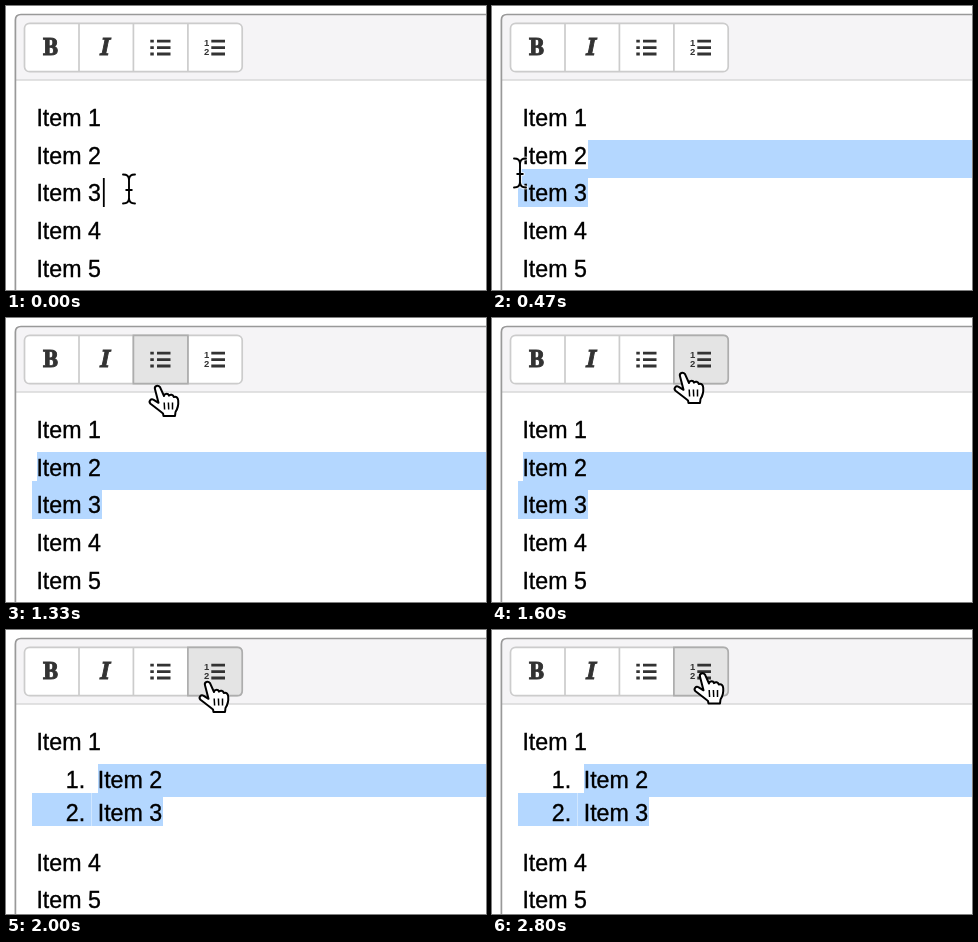
Recreate the animation shown at these times as an HTML page. Size 480 by 284 pixels, loop 2.94 s.

```html
<!DOCTYPE html>
<html lang="en">
<head>
<meta charset="utf-8">
<title>List editor</title>
<style>
  html, body { margin: 0; width: 100%; height: 100%; overflow: hidden; background: #fff; }
  svg { display: block; width: 100%; height: 100%; }
  .copy { font: 23.2px "Liberation Sans", Arial, Helvetica, sans-serif; fill: #000; stroke: #000; stroke-width: .35; }
  .serif { font: bold 23px "Noto Serif", serif; fill: #333; stroke: #333; stroke-width: .9; text-anchor: middle; }
  .slant { font-style: italic; }
  .tiny { font: bold 9.5px "Liberation Sans", Arial, sans-serif; fill: #333; }
  .sel { fill: #b4d7ff; }
</style>
</head>
<body>
<svg viewBox="0 0 480 284">
  <defs>
    <path id="beam" fill="none" stroke-linecap="round"
          d="M-6 -14.5C-2 -14.5 0 -13 0 -9V9C0 13 -2 14.5 -6 14.5M6 -14.5C2 -14.5 0 -13 0 -9M0 9C0 13 2 14.5 6 14.5M-2.8 1H2.8"/>
  </defs>

  <path d="M9.4 74V14Q9.4 8.5 15 8.5H500V74Z" fill="#f5f4f6"/>
  <path d="M10 74H480" stroke="#d9d9d9" stroke-width="1.5"/>
  <path d="M9.4 300V14Q9.4 8.5 15 8.5H500" fill="none" stroke="#999" stroke-width="1.7"/>

  <g stroke="#ccc" stroke-width="1.7">
    <rect x="18.5" y="17.3" width="217.7" height="48.4" rx="5" fill="#fff"/>
    <path d="M73 17V66M127.4 17V66M181.9 17V66"/>
    <path id="bullets" d="M127.4 17.3H181.9V65.7H127.4Z" fill="#e4e4e4" stroke="#adadad"/>
    <path id="numbers" d="M181.9 17.3H231.2Q236.2 17.3 236.2 22.3V60.7Q236.2 65.7 231.2 65.7H181.9Z" fill="#e4e4e4" stroke="#adadad"/>
  </g>

  <text class="serif" x="44.5" y="49.4">B</text>
  <text class="serif slant" x="98.8" y="49.4">I</text>
  <path id="bars" stroke="#333" stroke-width="2.8"/>
  <text class="tiny" x="198" y="40">1</text>
  <text class="tiny" x="198" y="49.3">2</text>

  <g id="selection"></g>
  <g id="plain" class="copy"></g>
  <g id="listed" class="copy"></g>
  <path id="caret" d="M97.8 172V201" stroke="#000" stroke-width="1.8"/>

  <g id="ibeam">
    <use href="#beam" stroke="#fff" stroke-opacity=".75" stroke-width="4"/>
    <use href="#beam" stroke="#000" stroke-width="1.9"/>
  </g>
  <g id="hand" stroke="#000" stroke-linejoin="round">
    <path fill="#fff" stroke-width="2"
          d="M-3 3.2C-4 0 0 -1.5 2 1.2L6 10C6 7.5 10 7 11 9.6C12.5 8 15 8.5 15.8 11C18.5 10 20 12 20.2 14.5C20.6 19 19.5 23 17.5 26L17 30H5.5L5 27.5C2.5 25.5 -2 22 -7.5 17.8C-9.8 15.4 -7.3 12.3 -4.3 13.8L.5 16.8Z"/>
    <path d="M6.2 16.5L6.6 23.5M10.4 16.5L10.7 23.5M14.5 16.5V23.5" stroke-width="1.5"/>
  </g>
</svg>
<script>
const LOOP = 2940, STEP = 200 / 3;
const LEFT = 30.4, INDENT = 91.7, NUMBER = 59.8, PITCH = 37.65;
const REACH_SECOND = 9, LIST_STEP = 30;

const easeIn = f => f * f;
const easeOut = f => 1 - (1 - f) ** 2;
const easeBoth = f => f * f * (3 - 2 * f);

// pointer legs, timed in steps
const origin = [123, 183];
const legs = [
  { from: 0, to: 7, x: 28, y: 167, ease: easeBoth },
  { from: 8, to: 11, x: 28, y: 154, ease: easeOut },
  { from: 16, to: 20, x: 152, y: 68, ease: easeIn },
  { from: 20, to: 24, x: 191, y: 55, ease: easeOut },
  { from: 24, to: 27, x: 202, y: 52, ease: easeOut },
  { from: 30, to: 37, x: 211, y: 43.5, ease: easeBoth }
];

const $ = id => document.getElementById(id);
const show = (id, on) => $(id).setAttribute("display", on ? "inline" : "none");
const text = (x, y, s) => `<text x="${x}" y="${y}">${s}</text>`;
const box = (x1, y1, x2, y2) => `<rect class="sel" x="${x1}" y="${y1}" width="${x2 - x1}" height="${y2 - y1}"/>`;

function build() {
  const rows = [35.2, 41.6, 48];
  $("bars").setAttribute("d", rows.map(y => `M144.3 ${y}h3.5M151 ${y}h13.5M205.3 ${y}h13.7`).join(""));

  const items = [1, 2, 3, 4, 5];
  const baseline = n => 82.4 + PITCH * n;
  $("plain").innerHTML = items.map(n => text(LEFT, baseline(n), "Item " + n)).join("");
  $("listed").innerHTML = items.map(n => {
    const inList = n === 2 || n === 3;
    const y = baseline(n) + (n === 3 ? -4.5 : n > 3 ? 7.6 : 0);
    return text(inList ? INDENT : LEFT, y, "Item " + n) + (inList ? text(NUMBER, y, n - 1 + ".") : "");
  }).join("");
}

function pointer(step) {
  return legs.reduce(([x, y], leg) => {
    const f = leg.ease(Math.min(1, Math.max(0, (step - leg.from) / (leg.to - leg.from))));
    return [x + (leg.x - x) * f, y + (leg.y - y) * f];
  }, origin);
}

// left edge of the letter in "Item 3" nearest to the pointer
function letterEdge(x) {
  const line = $("plain").children[2];
  const edges = [...line.textContent].map((_, i) => line.getStartPositionOfChar(i).x);
  return [...edges, 96].reduce((a, b) => Math.abs(b - x) < Math.abs(a - x) ? b : a);
}

function selection(step, x) {
  if (step >= LIST_STEP) return box(92, 134, 480, 167) + box(26, 163, 85.6, 196) + box(86, 163, 157, 196);
  const third = box(26, 163, 96, 201);
  if (step >= REACH_SECOND) return box(31, 134, 480, 172) + third;
  const from = letterEdge(x);
  if (from === 96) return "";
  return from < 31 ? box(96, 134, 480, 172) + third : box(from, 163, 96, 201);
}

function draw(time) {
  const step = Math.floor((time % LOOP + 3.4) / STEP);
  const [x, y] = pointer(step);
  const marked = selection(step, x);
  const overBar = y < 74, overButton = y < 70;
  const isList = step >= LIST_STEP;

  $("selection").innerHTML = marked;
  show("plain", !isList);
  show("listed", isList);
  show("caret", !marked);
  show("bullets", overButton && x < 181);
  show("numbers", overButton && x >= 181);
  show("ibeam", !overBar);
  show("hand", overBar);
  $(overBar ? "hand" : "ibeam").setAttribute("transform", `translate(${x} ${y})`);
}

build();
const start = performance.now();
function tick() {
  draw(performance.now() - start);
  requestAnimationFrame(tick);
}
tick();
</script>
</body>
</html>
```
